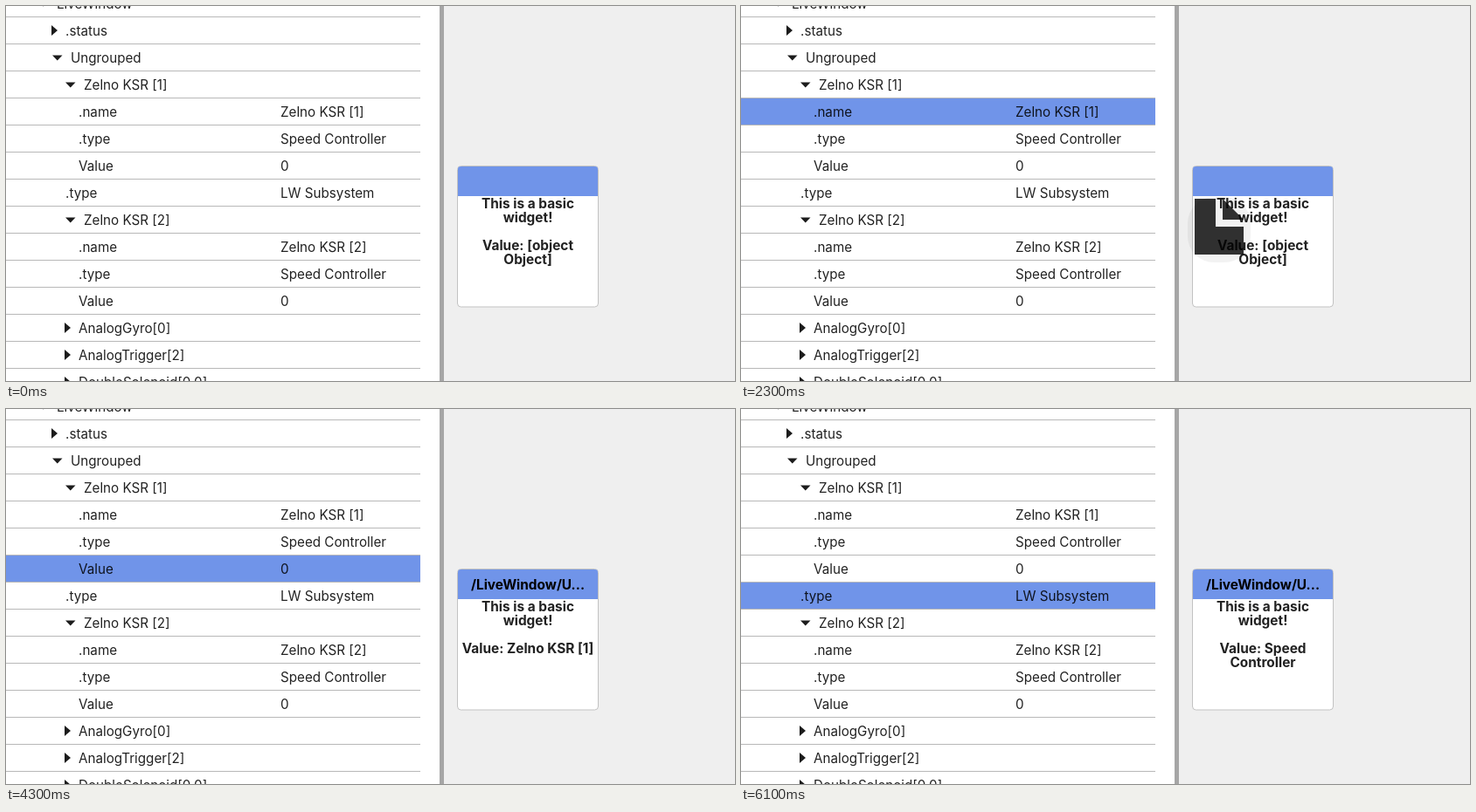
An HTML page for the animation above (6.2 s loop, 834 by 430 pixels).

```html
<!DOCTYPE html>
<html lang="en">
<head>
<meta charset="utf-8">
<title>Drag a value onto a widget</title>
<style>
html, body { margin: 0; width: 100%; height: 100%; overflow: hidden; background: #efefef; }
svg { display: block; width: 834px; height: 430px; }
text { font-family: Inter, Roboto, sans-serif; font-size: 15.2px; fill: #000; fill-opacity: .87; white-space: pre; }
.widget text { font-size: 15.4px; font-weight: 700; text-anchor: middle; }
.widget .title { fill-opacity: 1; }
</style>
</head>
<body>
<svg id="stage" viewBox="0 0 834 430">
  <rect width="834" height="430" fill="#efefef"/>
  <rect width="496" height="430" fill="#fff"/>
  <rect x="496" width="5" height="430" fill="#a6a6a6"/>
  <rect id="hover" width="474" height="30" fill="#7094e9"/>
  <g id="tree"></g>
  <g class="widget">
    <rect x="516.5" y="183.5" width="161" height="161.5" rx="4" fill="#fff" stroke="#c2c2c2"/>
    <path d="M517 218v-31q0-3 3-3h154q3 0 3 3v31z" fill="#7094e9"/>
    <text id="title" class="title" x="597" y="207">/LiveWindow/U...</text>
    <text x="597" y="232">This is a basic</text>
    <text x="597" y="248">widget!</text>
    <text id="line1" x="597" y="280"></text>
    <text id="line2" x="597" y="296"></text>
  </g>
  <g id="drag">
    <rect x="-8" y="-2" width="72" height="75" rx="30" fill-opacity=".05"/>
    <path id="file" transform="scale(8)" d="M0 0v8h7v-4h-4v-4zM4 0v3h3z"/>
  </g>
</svg>
<script>
const LOOP = 6200, STEP = 100, ROW = 31, TOP = -19;
const $ = id => document.getElementById(id);

// label x, label, value, arrow ("v" open, ">" closed)
const rows = [
  [58, "LiveWindow", "", "v"],
  [68, ".status", "", ">"],
  [74, "Ungrouped", "", "v"],
  [89, "Zelno KSR [1]", "", "v"],
  [83, ".name", "Zelno KSR [1]"],
  [83, ".type", "Speed Controller"],
  [83, "Value", "0"],
  [68, ".type", "LW Subsystem"],
  [89, "Zelno KSR [2]", "", "v"],
  [83, ".name", "Zelno KSR [2]"],
  [83, ".type", "Speed Controller"],
  [83, "Value", "0"],
  [83, "AnalogGyro[0]", "", ">"],
  [83, "AnalogTrigger[2]", "", ">"],
  [83, "DoubleSolenoid[0,0]", "", ">"]
];
const NAME = 4, TYPE = 5, VALUE = 6, SUBTYPE = 7;

$("tree").innerHTML = rows.map(([x, label, value, arrow], i) => {
  const y = TOP + i * ROW;
  const tip = arrow === "v" ? `M${x - 21} ${y + 13.5}h11.5l-5.75 6z`
    : arrow ? `M${x - 16} ${y + 10}v12l7-6z` : "";
  return `<rect y="${y + ROW}" width="474" height="1" fill="#b8b8b8"/>
    <path d="${tip}" fill="#1c1c1c"/>
    <text x="${x}" y="${y + 22}">${label}</text>
    <text x="314" y="${y + 22}">${value}</text>`;
}).join("");

// start time, hovered row
const hovers = [
  [0, -1], [1600, TYPE], [1900, NAME], [3500, -1],
  [4100, TYPE], [4200, VALUE], [4500, TYPE], [5500, -1], [6000, SUBTYPE]
];
// start time, widget lines
const values = [
  [0, "Value: [object", "Object]"],
  [3500, "Value: Zelno KSR [1]", ""],
  [5500, "Value: Speed", "Controller"]
];
// time, x, y, opacity
const drags = [
  [[2000, 300, 112, .7], [2300, 519, 221, .8], [2600, 570, 246, .9], [3100, 584, 254, .91], [3500, 584, 254, .91]],
  [[4700, 300, 143, .7], [4900, 490, 220, .8], [5100, 559, 243, .9], [5300, 570, 248, .91], [5500, 570, 248, .91]]
];

const current = (list, t) => list.filter(e => e[0] <= t).pop();

function along(path, t) {
  const i = path.findIndex(p => p[0] > t);
  const a = path[i - 1], b = path[i], k = (t - a[0]) / (b[0] - a[0]);
  return a.map((v, j) => v + (b[j] - v) * k);
}

function draw(t) {
  const row = current(hovers, t)[1];
  $("hover").setAttribute("visibility", row < 0 ? "hidden" : "visible");
  $("hover").setAttribute("y", TOP + 1 + row * ROW);

  const [since, first, second] = current(values, t);
  $("title").setAttribute("visibility", since ? "visible" : "hidden");
  $("line1").textContent = first;
  $("line2").textContent = second;

  const path = drags.find(p => t >= p[0][0] && t < p[p.length - 1][0]);
  $("drag").setAttribute("visibility", path ? "visible" : "hidden");
  if (path) {
    const [, x, y, alpha] = along(path, t);
    $("drag").setAttribute("transform", `translate(${x} ${y})`);
    $("file").setAttribute("fill-opacity", alpha);
  }
}

const start = performance.now();
function tick() {
  const t = (performance.now() - start) % LOOP;
  draw(Math.floor(t / STEP) * STEP);
  requestAnimationFrame(tick);
}
tick();
</script>
</body>
</html>
```
